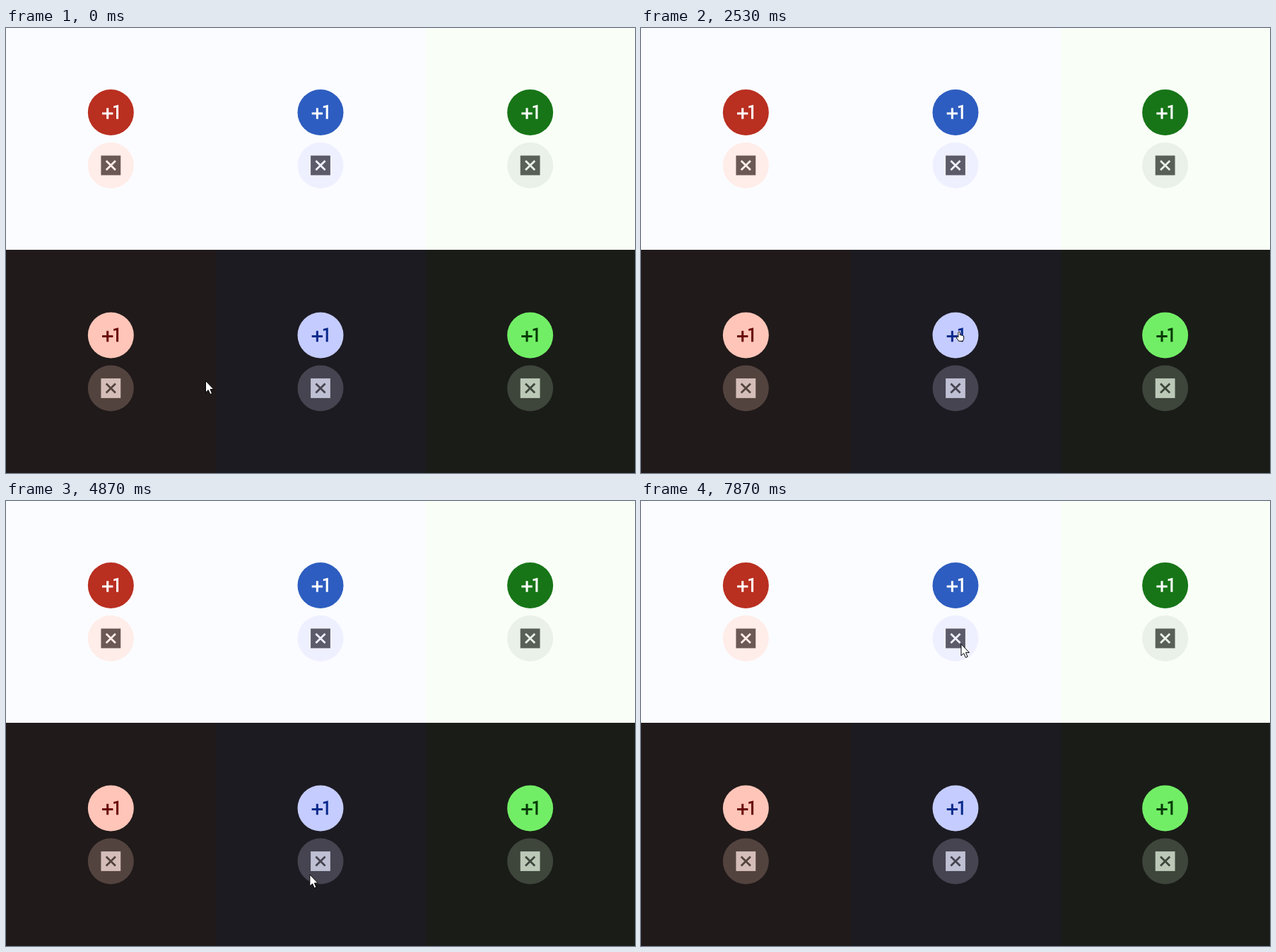
An HTML page for the animation above (8000 ms loop, 890x630 px).

```html
<!DOCTYPE html>
<html lang="en">
<head>
<meta charset="utf-8">
<title>Icon buttons</title>
<style>
html, body { margin: 0; width: 100%; height: 100%; overflow: hidden; }
svg { display: block; width: 890px; height: 630px; }
</style>
</head>
<body>
<svg viewBox="0 0 890 630">
  <defs>
    <clipPath id="disc"><circle r="32.5"/></clipPath>
    <path id="plus" transform="scale(1.54) translate(-12 -12)"
      d="M10 8H8v4H4v2h4v4h2v-4h4v-2h-4zM14.5 6.08V7.9l2.5-.5V18h2V5z"/>
    <path id="cross" d="M-6.6-6.6L6.6 6.6M6.6-6.6L-6.6 6.6" stroke-width="2.8"/>
  </defs>
  <g id="panels"></g>
  <g id="cursor" stroke="#000" fill="#fff" stroke-linejoin="round">
    <path id="arrow" d="M.5.5V17L4.2 13.6L6.9 19.6L9.6 18.4L7 12.6H12Z"/>
    <path id="hand" d="M-1.3 8V1.6Q-1.3.5 0 .5T1.3 1.6V5Q2.6 4.4 3.2 5.4Q4.6 4.8 5 6Q6.5 5.7 6.5 7.2V9.5Q6.3 11.5 5 13.5H-.6Q-1.8 11.4-3.6 9.2Q-4.3 7.6-2.8 7.2Z"/>
  </g>
</svg>
<script>
const LOOP = 8000, STEP = 1000 / 15, RADIUS = 32.5;
const $ = id => document.getElementById(id);

// page, filled button, its icon, tonal button, its icon, state layer if not the icon colour
const buttons = [
  ['#fbfcff', '#b92f20', '#fff', '#ffede9', '#6b5956'],
  ['#fbfcff', '#2d5dc0', '#fff', '#eff0ff', '#5c5b6a'],
  ['#f9fff7', '#177517', '#fff', '#eaf1e8', '#586057'],
  ['#201a1a', '#ffc5b8', '#6b0808', '#53433f', '#d5beb9', '#7890a0'],
  ['#1c1b21', '#c5ccff', '#0a2b8c', '#454450', '#bfc0d3'],
  ['#1a1c18', '#72ee66', '#063a06', '#3e463b', '#bcc8b8']
].map(([page, main, ink, tone, mark, layer = ink], i) => {
  const col = i % 3, row = Math.floor(i / 3);
  return { page, main, ink, tone, mark, layer, col, row, light: row === 0,
    x: 890 * (col + .5) / 3, y: 119.5 + 315.5 * row };
});

$('panels').innerHTML = buttons.map((b, i) => `
  <rect x="${297 * b.col}" y="${314 * b.row}" width="297" height="316" fill="${b.page}"/>
  <g transform="translate(${b.x} ${b.y})">
    <circle r="${RADIUS}" fill="${b.main}"/><use href="#plus" fill="${b.ink}"/>
    <circle id="hover${i}" r="${RADIUS}" fill="${b.layer}"/>
    <g clip-path="url(#disc)"><rect id="press${i}" y="-33" height="66" fill="${b.layer}"/></g>
  </g>
  <g transform="translate(${b.x} ${b.y + 75})">
    <circle r="${RADIUS}" fill="${b.tone}"/>
    <rect x="-13.9" y="-13.9" width="27.8" height="27.8" fill="${b.mark}"/>
    <use href="#cross" stroke="${b.tone}"/>
  </g>`).join('');

// Pointer trips: first step, last step, bend point, end point; it rests in between.
const home = [282, 499];
const trips = [
  [0, 5, [262, 690], [139, 390]],
  [7, 12, [350, 515], [146, 409]],
  [18, 27, [140, 440], [165, 485]],
  [27, 34, [300, 530], [508, 440]],
  [36, 39, [440, 431], [446, 426]],
  [48, 58, [1150, 470], [723.5, 440]],
  [62, 81, [300, 580], [462, 500]],
  [90, 98, [430, 199], [445, 41]],
  [98, 101, [440, 60], [431, 88]],
  [106, 115, [455, 115], [431, 152]],
  [116, 118, [446, 175], [452.5, 202]]
];
const clicks = [15, 43, 58, 104];

function locate(n) {
  let from = home;
  for (const [start, end, bend, to] of trips) {
    if (n <= start) break;
    const t = Math.min(1, (n - start) / (end - start)), u = 1 - t;
    from = from.map((a, i) => a * u * u + 2 * bend[i] * t * u + to[i] * t * t);
  }
  return from;
}

function buttonAt(n) {
  const [x, y] = locate(n);
  return buttons.findIndex(b => Math.hypot(x - b.x, y - b.y) < RADIUS + 2.5);
}

const clamp = v => Math.max(0, Math.min(1, v));

// The press grows sideways, holds, then fades out.
function drawPress(i, age, power) {
  const half = Math.min(33, 10 + 10.5 * age);
  const band = $('press' + i);
  band.setAttribute('opacity', age < 0 ? 0 : power * clamp((12 - age) / 8));
  band.setAttribute('x', half < 33 ? 3.5 - half : -33);
  band.setAttribute('width', 2 * Math.max(0, half));
}

function frame() {
  const n = Math.floor((performance.now() % LOOP + 4) / STEP) % 120;
  const [x, y] = locate(n);
  // The pointer shape lags one step behind the position, the hover layer two.
  const overButton = buttonAt(n - 1) >= 0, hovered = buttonAt(n - 2);
  const click = clicks.filter(c => c <= n).pop();
  const pressed = click === undefined ? -1 : buttonAt(click);

  $('cursor').setAttribute('transform', `translate(${x} ${y})`);
  $('hand').setAttribute('visibility', overButton ? 'visible' : 'hidden');
  $('arrow').setAttribute('visibility', overButton ? 'hidden' : 'visible');
  buttons.forEach((b, i) => {
    $('hover' + i).setAttribute('opacity', i === hovered ? (b.light ? .1 : .05) : 0);
    drawPress(i, i === pressed ? n - click : -1, b.light ? .21 : .12);
  });
  requestAnimationFrame(frame);
}
frame();
</script>
</body>
</html>
```
